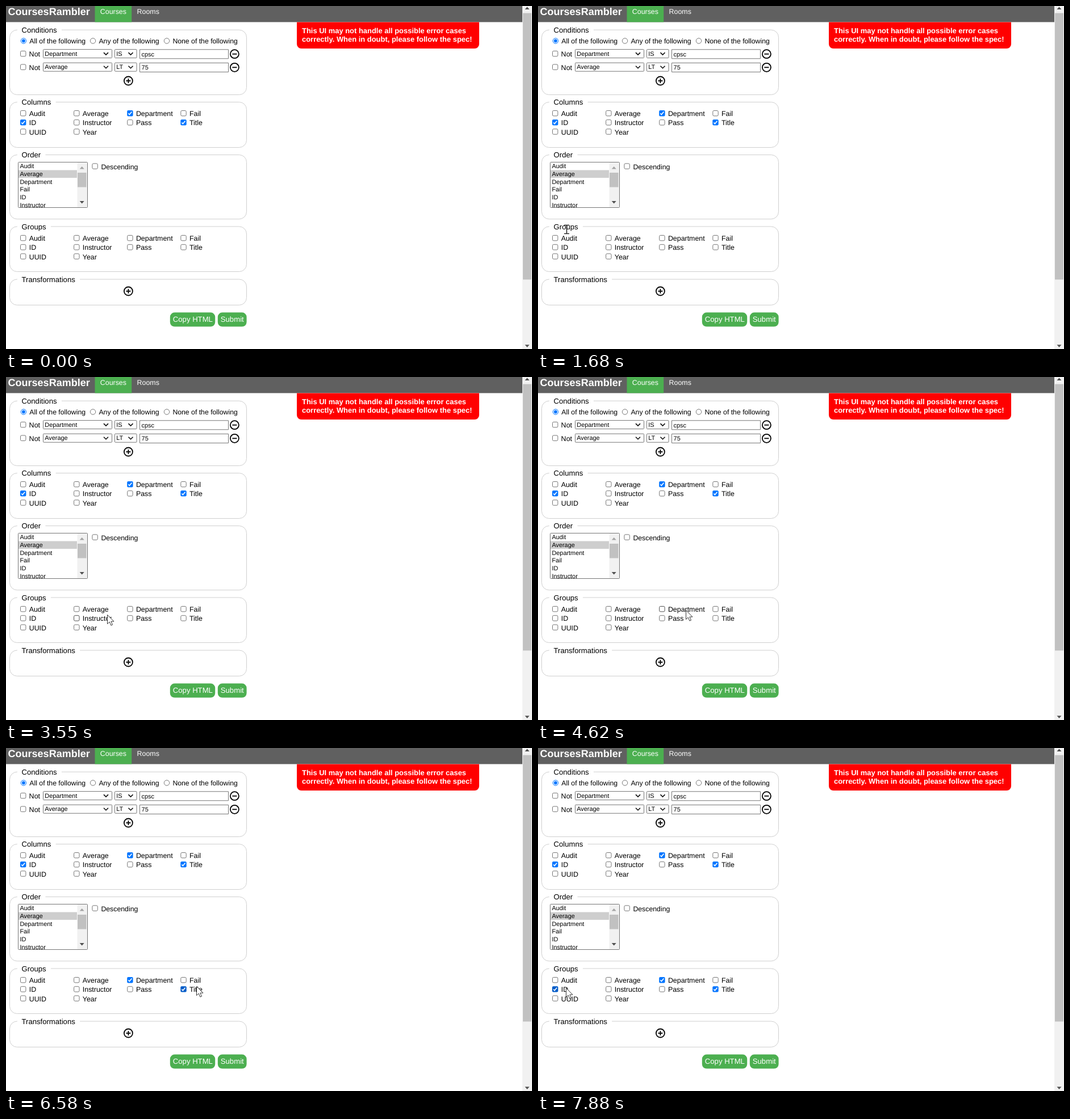
An HTML page with a canvas that plays this animation: 926 by 605 pixels, repeating every 8000 ms.

```html
<!DOCTYPE html>
<html lang="en">
<head>
<meta charset="utf-8">
<title>Course query form</title>
<style>
  html, body { margin: 0; width: 100%; height: 100%; overflow: hidden; background: #fff; }
  canvas { display: block; }
</style>
</head>
<body>
<canvas id="stage" width="926" height="605"></canvas>
<script>
const ctx = document.getElementById('stage').getContext('2d');
const LOOP = 8000, TICK = 77;
const GREEN = '#4caf50', BLUE = '#0075ff', GRAY = '#767676', INK = '#222';
const FAMILY = '"Liberation Sans", Arial, sans-serif';
const FIELDS = [
  ['Audit', 'Average', 'Department', 'Fail'],
  ['ID', 'Instructor', 'Pass', 'Title'],
  ['UUID', 'Year']
];
const HEADER = 28.4;

// Each stroke eases the pointer from where it rests to (x, y)
const ENTRY = { x: 758, y: 590 };
const STROKES = [
  { start: 530, end: 1300, x: 297, y: 403 },
  { start: 1370, end: 1680, x: 50, y: 394 },
  { start: 1680, end: 1990, x: 64, y: 434 },
  { start: 1990, end: 2140, x: 128, y: 433 },
  { start: 2220, end: 2600, x: 247, y: 424 },
  { start: 2600, end: 3000, x: 179, y: 413 },
  { start: 3320, end: 3550, x: 178, y: 419 },
  { start: 3550, end: 3700, x: 183, y: 426 },
  { start: 3850, end: 4620, x: 260, y: 411 },
  { start: 5410, end: 5870, x: 328, y: 428 },
  { start: 5950, end: 6030, x: 335, y: 420 },
  { start: 6580, end: 7270, x: 52, y: 427 },
  { start: 7420, end: 7730, x: 49, y: 423 }
];
const CLICKS = [
  { field: 'Department', down: 4870, up: 4950 },
  { field: 'Title', down: 6180, up: 6330 },
  { field: 'ID', down: 7730, up: 7880 }
];

function text(str, x, y, size = 12.4, color = '#000', weight = '') {
  ctx.font = `${weight} ${size}px ${FAMILY}`;
  ctx.fillStyle = color;
  ctx.fillText(str, x, y);
}

function rect(x, y, w, h, color) {
  ctx.fillStyle = color;
  ctx.fillRect(x, y, w, h);
}

function paint(fill, stroke, width = 1) {
  if (fill) { ctx.fillStyle = fill; ctx.fill(); }
  if (stroke) { ctx.strokeStyle = stroke; ctx.lineWidth = width; ctx.stroke(); }
}

function rounded(x, y, w, h, radius, fill, stroke) {
  ctx.beginPath();
  ctx.roundRect(x, y, w, h, radius);
  paint(fill, stroke);
}

function disc(x, y, r, fill, stroke, width) {
  ctx.beginPath();
  ctx.arc(x, y, r, 0, Math.PI * 2);
  paint(fill, stroke, width);
}

function line(points, color, width) {
  ctx.beginPath();
  points.forEach(([x, y]) => ctx.lineTo(x, y));
  paint(null, color, width);
}

function triangle(x, y, dir, color) {
  ctx.beginPath();
  ctx.moveTo(x - 4, y - 2 * dir);
  ctx.lineTo(x + 4, y - 2 * dir);
  ctx.lineTo(x, y + 2.4 * dir);
  paint(color);
}

function fieldset(title, y, bottom) {
  rounded(6.5, y, 417, bottom - y, 13, '#fff', '#cfcfcf');
  ctx.font = `13.1px ${FAMILY}`;
  rect(20, y - 2, ctx.measureText(title).width + 16, 4, '#fff');
  text(title, 27.6, y + 4.8, 13.1);
}

function checkbox(x, y, { checked, hover, active } = {}) {
  if (checked) {
    rounded(x - 5.2, y - 5.2, 10.4, 10.4, 2, active ? '#3793ff' : hover ? '#005cc8' : BLUE);
    line([[x - 3, y + 0.2], [x - 1, y + 2.4], [x + 3, y - 2.6]], '#fff', 1.6);
  } else {
    rounded(x - 4.7, y - 4.7, 9.4, 9.4, 2, '#fff', active ? '#8d8d8d' : hover ? '#4f4f4f' : GRAY);
  }
}

function radio(x, label, selected) {
  disc(x, 61.5, 4.7, '#fff', selected ? BLUE : GRAY);
  if (selected) disc(x, 61.5, 2.9, BLUE);
  text(label, x + 10.4, 66.3, 12.25);
}

function iconButton(x, y, plus) {
  disc(x, y, 7.5, null, '#000', 1.8);
  line([[x - 4, y], [x + 4, y]], '#000', 1.8);
  if (plus) line([[x, y - 4], [x, y + 4]], '#000', 1.8);
}

function select(x, y, w, label) {
  rounded(x + 0.5, y - 7.5, w, 15, 1, '#fff', GRAY);
  text(label, x + 3.3, y + 3.7, 10.9);
  const cx = x + w - 10;
  line([[cx - 4, y - 2], [cx, y + 2], [cx + 4, y - 2]], '#111', 1.6);
}

function condition(y, key, op, value) {
  checkbox(30.2, y - 0.3);
  text('Not', 40.6, y + 4.6, 12.5);
  select(65, y - 0.3, 121, key);
  select(191, y - 0.3, 38.5, op);
  rounded(235.5, y - 7.6, 156, 16, 0, '#fff', GRAY);
  text(value, 238.6, y + 4.3, 10.9);
  iconButton(402.4, y + 0.3, false);
}

function fieldGrid(top, stateOf) {
  FIELDS.forEach((row, r) => row.forEach((name, c) => {
    const x = 30.2 + c * 94.1, y = top + r * 16.2;
    checkbox(x, y, stateOf(name, x, y));
    text(name, x + 10.5, y + 4.9);
  }));
}

function orderList() {
  const items = FIELDS.flat().slice(0, 6);
  rounded(21.5, 275.5, 122, 80, 1, '#fff', GRAY);
  ctx.save();
  ctx.beginPath();
  ctx.rect(22, 276, 121, 79);
  ctx.clip();
  rect(22, 289.5, 103, 13.6, '#cecece');
  items.forEach((item, i) => text(item, 24.4, 286 + i * 13.75, 10.9));
  rect(125.5, 276, 17.5, 79, '#f1f1f1');
  rect(126, 294, 15.5, 25.5, '#c1c1c1');
  triangle(133.7, 285.5, -1, '#a3a3a3');
  triangle(133.7, 346, 1, '#505050');
  ctx.restore();
  checkbox(156.6, 282.6);
  text('Descending', 167.4, 287.5, 12.3);
}

function button(x, w, label) {
  rounded(x, 540.6, w, 25, 8, GREEN);
  text(label, x + 5, 557, 13.15, '#fff');
}

function page(stateOf) {
  rect(0, 0, 926, 605, '#fff');
  rect(0, 0, 909, HEADER, '#606060');
  rect(156.5, 0, 64.7, HEADER, GREEN);
  text('CoursesRambler', 3.6, 16, 18, '#fff', 'bold');
  text('Courses', 165.8, 14.2, 12.4, '#fff');
  text('Rooms', 230.6, 14.2, 12.4, '#fff');

  rounded(512, HEADER, 321, 75 - HEADER, [0, 0, 8, 8], '#f00');
  text('This UI may not handle all possible error cases', 521, 48.2, 12.95, '#fff', 'bold');
  text('correctly. When in doubt, please follow the spec!', 521, 63, 12.95, '#fff', 'bold');

  rect(909, 0, 17, 605, '#f1f1f1');
  rect(910, 12.5, 15, 470, '#c1c1c1');
  triangle(917.5, 4, -1, '#505050');
  triangle(917.5, 599.5, 1, '#505050');

  fieldset('Conditions', 42.2, 156.5);
  radio(30.9, 'All of the following', true);
  radio(153, 'Any of the following');
  radio(283, 'None of the following');
  condition(84.4, 'Department', 'IS', 'cpsc');
  condition(108, 'Average', 'LT', '75');
  iconButton(215.4, 132, true);

  fieldset('Columns', 169.5, 249.5);
  fieldGrid(189.2, name => ({ checked: ['Department', 'ID', 'Title'].includes(name) }));
  fieldset('Order', 262.5, 375.8);
  orderList();
  fieldset('Groups', 389, 468.5);
  fieldGrid(409.2, stateOf);
  fieldset('Transformations', 482, 527.5);
  iconButton(215.4, 503, true);
  button(288.8, 79.4, 'Copy HTML');
  button(372.8, 50.8, 'Submit');
}

const easeOut = k => 1 - (1 - k) ** 2.4;

function pointerAt(t) {
  const i = STROKES.findLastIndex(s => s.start <= t);
  if (i < 0) return null;
  const from = STROKES[i - 1] || ENTRY, to = STROKES[i];
  const elapsed = Math.floor((t - to.start) / TICK + 0.15) * TICK;
  const k = easeOut(Math.min(1, elapsed / (to.end - to.start)));
  const mix = axis => Math.round(from[axis] + (to[axis] - from[axis]) * k);
  return { x: mix('x'), y: mix('y') };
}

function arrow({ x, y }) {
  const outline = [[0, 0], [0, 16], [3.7, 12.5], [6.4, 18.6], [9, 17.5], [6.4, 11.6], [11.5, 11.6]];
  ctx.beginPath();
  outline.forEach(([dx, dy]) => ctx.lineTo(x + 0.5 + dx, y + 0.5 + dy));
  ctx.closePath();
  paint('#fff', INK, 0.9);
}

function textBeam({ x, y }) {
  line([[x + 0.5, y - 7.5], [x + 0.5, y + 7.5]], INK, 1.5);
  for (const dy of [-7.5, 7.5]) line([[x - 4, y + dy], [x + 5, y + dy]], INK, 1.4);
}

function draw(t) {
  const pointer = pointerAt(t);
  const pressed = CLICKS.find(c => t >= c.down && t < c.up);
  const stateOf = (name, x, y) => {
    ctx.font = `12.4px ${FAMILY}`;
    const right = x + 10.5 + ctx.measureText(name).width;
    return {
      checked: CLICKS.some(c => c.field === name && t >= c.up),
      active: pressed && pressed.field === name,
      hover: pointer && pointer.x >= x - 5 && pointer.x <= right && Math.abs(pointer.y - y) < 8
    };
  };
  page(stateOf);
  if (!pointer) return;
  const onLegend = pointer.x > 27 && pointer.x < 71 && pointer.y > 382 && pointer.y < 398;
  (pressed || onLegend ? textBeam : arrow)(pointer);
}

function tick() {
  ctx.textRendering = 'geometricPrecision';
  draw(performance.now() % LOOP);
  requestAnimationFrame(tick);
}
tick();
</script>
</body>
</html>
```
